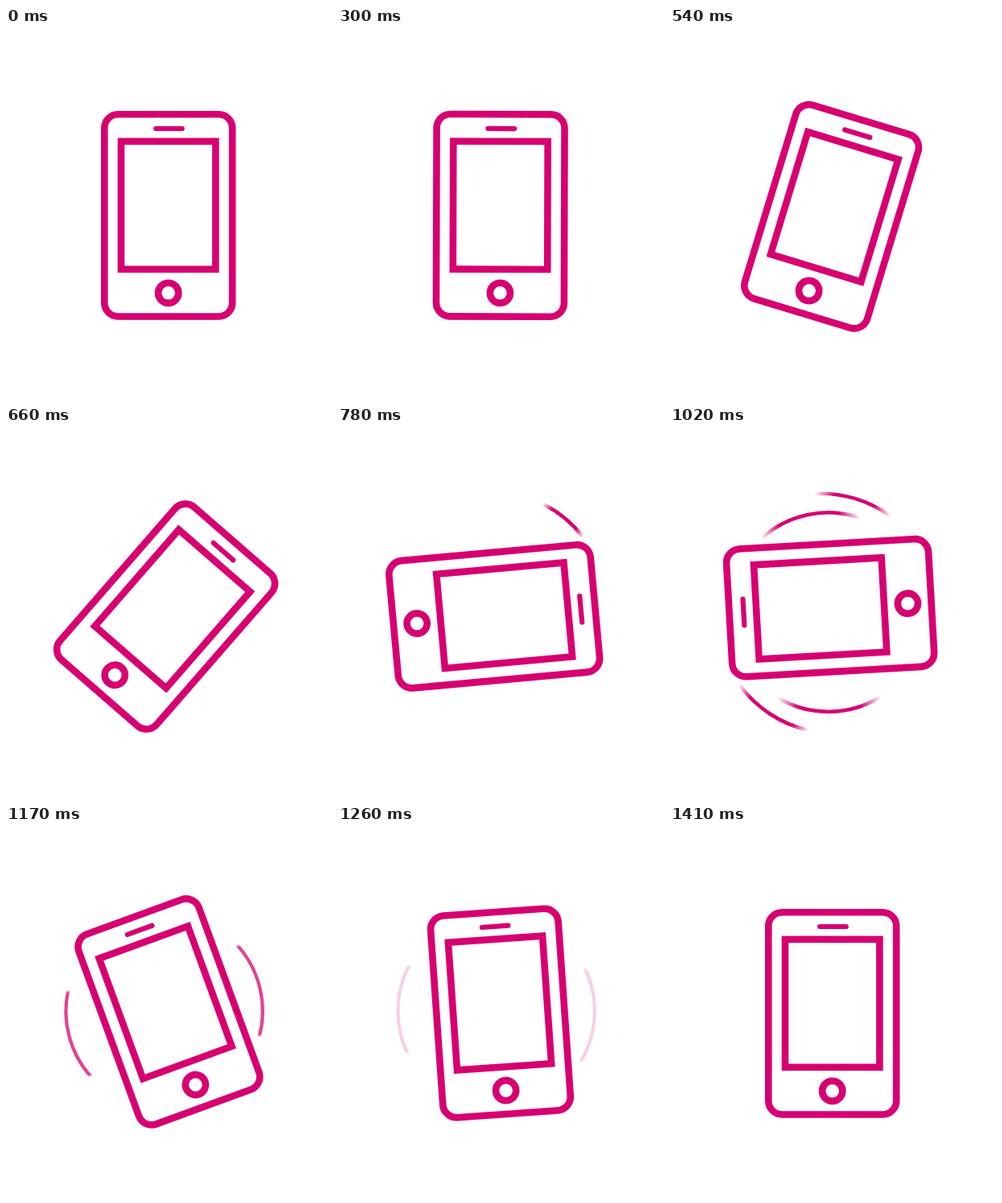
Write an HTML page with a canvas that moves like this. It is 405 by 461 pixels and loops after 1590 ms.

```html
<!DOCTYPE html>
<html lang="en">
<head>
<meta charset="utf-8">
<title>Rotating phone</title>
<style>
  html, body { margin: 0; overflow: hidden; background: #fff; }
  canvas { display: block; width: 405px; height: 461px; }
</style>
</head>
<body>
<canvas id="stage"></canvas>
<script>
const W = 405, H = 461, LOOP = 1590, STEP = 30;
const SPIN_START = 270, SPIN_END = 1410;
const PIVOT = [196.6, 230];
const RGB = '215,0,113';

const canvas = document.getElementById('stage');
const dpr = window.devicePixelRatio || 1;
canvas.width = W * dpr;
canvas.height = H * dpr;
const ctx = canvas.getContext('2d');

const clamp = v => Math.min(1, Math.max(0, v));
const lerp = (a, b, p) => a + (b - a) * p;
const ramp = (t, from, to) => clamp((t - from) / (to - from));
const rad = deg => deg * Math.PI / 180;

const bezier = (s, a, b) => 3 * (1 - s) ** 2 * s * a + 3 * (1 - s) * s * s * b + s ** 3;

// Slow start, fast middle and a slight overshoot before settling.
function spinEase(x) {
  if (x <= 0 || x >= 1) return clamp(x);
  let lo = 0, hi = 1;
  for (let i = 0; i < 30; i++) {
    const mid = (lo + hi) / 2;
    if (bezier(mid, 0.74, 0.47) < x) lo = mid; else hi = mid;
  }
  return bezier(lo, 0, 1.062);
}

function drawPhone() {
  ctx.strokeStyle = `rgb(${RGB})`;
  ctx.lineCap = 'round';
  ctx.lineWidth = 8.6;
  ctx.beginPath();
  ctx.roundRect(122.3, 107.2, 158.9, 251.3, 17);
  ctx.stroke();
  ctx.strokeRect(143, 140.9, 117.4, 158.9);
  ctx.beginPath();
  ctx.arc(201.7, 329.3, 12.6, 0, 2 * Math.PI);
  ctx.stroke();
  ctx.lineWidth = 6.2;
  ctx.beginPath();
  ctx.moveTo(186.2, 125);
  ctx.lineTo(218.8, 125);
  ctx.stroke();
}

// Arc in degrees whose ends fade out over the given share of its length.
function drawTrail(cx, cy, r, from, to, alpha, fade, width) {
  if (alpha <= 0) return;
  const a = rad(from), b = rad(to);
  const paint = ctx.createLinearGradient(
    cx + r * Math.cos(a), cy + r * Math.sin(a),
    cx + r * Math.cos(b), cy + r * Math.sin(b));
  const solid = `rgba(${RGB},${alpha})`, clear = `rgba(${RGB},0)`;
  paint.addColorStop(0, clear);
  paint.addColorStop(fade, solid);
  paint.addColorStop(1 - fade, solid);
  paint.addColorStop(1, clear);
  ctx.strokeStyle = paint;
  ctx.lineCap = 'butt';
  ctx.lineWidth = width;
  ctx.beginPath();
  ctx.arc(cx, cy, r, a, b);
  ctx.stroke();
}

function drawTrails(t) {
  const [px, py] = PIVOT;
  const out = 1 - ramp(t, 1040, 1140);
  const tail = lerp(-148, -164, ramp(t, 780, 1020)) + 40 * (1 - ramp(t, 690, 780)) * 0.6;
  drawTrail(px - 4.9, py + 7.5, 146, tail, -122.5, ramp(t, 700, 780) * out, 0.2, 4.6);
  drawTrail(px + 2.6, py - 8.6, 145.2, lerp(25, 0, ramp(t, 800, 960)), 39.5,
    ramp(t, 790, 880) * out, 0.24, 4.6);

  const p = ramp(t, 1020, 1170);
  const alpha = ramp(t, 860, 960) * (t < 1170 ? lerp(1, 0.74, ramp(t, 1080, 1170))
    : 0.74 * (1 - ramp(t, 1170, 1290)));
  const fade = lerp(0.2, 0.03, p), width = lerp(4.6, 4.2, p), r = lerp(123.7, 122.2, p);
  drawTrail(px, py, r, lerp(-208.5, -202, p), lerp(-146, -147.5, p), alpha, fade, width);
  drawTrail(px, py, r, lerp(-39, -22.5, p), lerp(22, 35.5, p), alpha, fade, width);
}

function render(now) {
  const t = Math.floor((now % LOOP) / STEP) * STEP;
  const turn = spinEase((t - SPIN_START) / (SPIN_END - SPIN_START));
  // The first 300 ms are a hold.
  const angle = t < 300 ? 0 : turn * 2 * Math.PI;
  ctx.setTransform(dpr, 0, 0, dpr, 0, 0);
  ctx.fillStyle = '#fff';
  ctx.fillRect(0, 0, W, H);
  ctx.translate(...PIVOT);
  ctx.rotate(angle);
  ctx.translate(-PIVOT[0], -PIVOT[1]);
  drawTrails(t);
  drawPhone();
}

const start = performance.now();
function tick() {
  render(performance.now() - start);
  requestAnimationFrame(tick);
}
tick();
</script>
</body>
</html>
```
